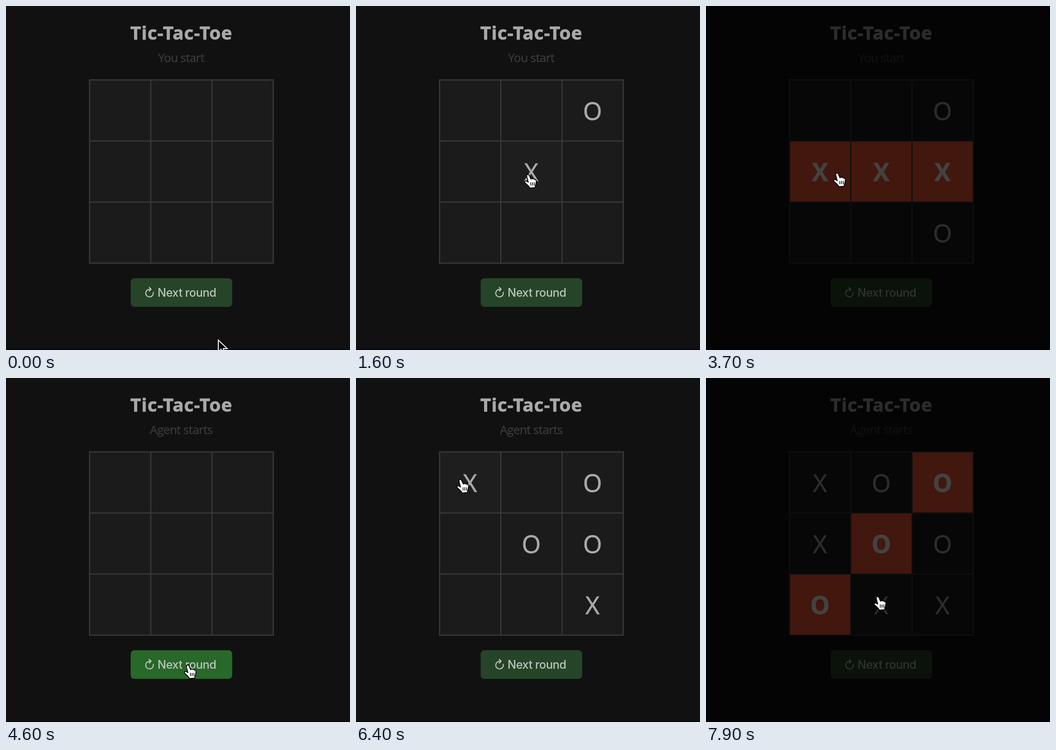
An HTML page that plays this animation: 747x749 px, repeating every 8 s.

```html
<!DOCTYPE html>
<html lang="en">
<head>
<meta charset="utf-8">
<title>Tic-Tac-Toe</title>
<style>
  html, body { margin: 0; width: 100%; height: 100%; overflow: hidden; background: #111; }
  svg { display: block; width: 100%; height: 100%; }
  text { font-family: "Open Sans", "Noto Sans", sans-serif; text-anchor: middle; fill: #a9a9a9; stroke: #a9a9a9; stroke-width: .8; }
  .title { font-size: 40px; font-weight: 700; letter-spacing: .022em; }
  .sub { font-size: 26px; letter-spacing: -.03em; fill: #3a3a3a; stroke: #3a3a3a; stroke-width: .4; }
  .mark { font-size: 53px; }
  .mark.win { font-weight: 700; fill: #fff; stroke: #fff; }
  .label { font-family: Inter, Roboto, sans-serif; font-size: 25px; font-weight: 500; letter-spacing: -.02em; text-anchor: start; fill: #bcc3bc; stroke: none; }
</style>
</head>
<body>
<svg viewBox="0 0 747 749"></svg>
<script>
const LOOP = 8000, STEP = 100, TRAVEL = 500, RESET = 4600;
const svg = document.querySelector('svg');

// Cursor stops: arrival time, x, y and, for a turn, the cell of the reply (-1: none).
// A turn puts X in the cell under the cursor, then O in the reply cell.
const stops = [
  [0, 461, 726], [300, 375, 440], [800, 242, 352], [1600, 372, 366, 2],
  [2100, 476, 384], [3000, 476, 384, 8], [3700, 283, 363, -1],
  [RESET, 393, 624], [5200, 393, 624, 2], [5700, 510, 490, 5],
  [6200, 225, 220, 4], [7000, 240, 360, 1], [7800, 371, 475, 6]
];

const lines = ['012', '345', '678', '036', '147', '258', '048', '246'];
const CELL = 130.4, PITCH = 133, LEFT = 182.7, TOP = 162.2;

function cursorAt(t) {
  const i = stops.findLastIndex(s => s[0] <= t);
  const [t0, x0, y0] = stops[i], [t1, x1, y1] = stops[i + 1] || [LOOP, x0, y0];
  const time = Math.min(TRAVEL, t1 - t0);
  const k = Math.max(0, 1 - (t1 - t) / time);
  const ease = k * k * (3 - 2 * k);
  return [x0 + (x1 - x0) * ease, y0 + (y1 - y0) * ease];
}

function cellAt(x, y) {
  const col = Math.floor((x - LEFT) / PITCH), row = Math.floor((y - TOP) / PITCH);
  return col >= 0 && col < 3 && row >= 0 && row < 3 ? row * 3 + col : -1;
}

function boardAt(t) {
  const board = Array(9).fill('');
  const put = (mark, cell) => { if (cell >= 0) board[cell] = mark; };
  for (const [at, x, y, reply] of stops) {
    if (reply === undefined || at > t || (at < RESET && t >= RESET)) continue;
    put('X', cellAt(x, y));
    put('O', reply);
  }
  return board;
}

const rect = (x, y, w, h, fill, extra = '') =>
  `<rect x="${x}" y="${y}" width="${w}" height="${h}" fill="${fill}" ${extra}/>`;
const text = (x, y, cls, s) => `<text x="${x}" y="${y}" class="${cls}">${s}</text>`;

const hand = `<path d="M-1.5 4Q-1.5 1 1 .8Q3.6 .6 4.6 3.5L7.8 11Q10 9 12.5 10.5Q15 9.6 16.5 12
  Q19.8 12 19.7 15.5L18.5 22Q17 25 17 29.5L5.5 30.5Q4 27 1 24.5L-5.5 18.5Q-6.5 14.2 -2 15L2 17.5Z"
  fill="#fff" stroke="#000" stroke-width="1.8" stroke-linejoin="round"/>
  <path d="M7.5 18V25M11.3 18V25M15 18V25" stroke="#000" stroke-width="1.5"/>`;
const arrow = `<path d="M0 1.5V27L6 21.5L10.5 31.5L15 29.5L10.8 20H19.5Z"
  fill="#000" stroke="#fff" stroke-width="2"/>`;
const icon = `<path d="M319.6 622.5A8.3 8.3 0 1 1 311.5 616.8H314M310.5 612L315 616.8L310.5 621.4"
  fill="none" stroke="#bcc3bc" stroke-width="2.3"/>`;

function draw(t) {
  const [cx, cy] = cursorAt(t), board = boardAt(t), over = cellAt(cx, cy);
  const won = lines.find(l => board[l[0]] && [...l].every(c => board[c] === board[l[0]])) || '';
  const onButton = cx > 271 && cx < 491 && cy > 593 && cy < 655;

  let out = rect(0, 0, 747, 749, '#111') + rect(0, 747.6, 747, 1.4, '#000')
    + text(380.9, 73, 'title', 'Tic-Tac-Toe')
    + text(380.5, 122, 'sub', t < RESET ? 'You start' : 'Agent starts')
    + rect(180.1, 159.6, 401.6, 401.6, '#393939');

  board.forEach((mark, i) => {
    const x = LEFT + PITCH * (i % 3), y = TOP + PITCH * Math.floor(i / 3);
    const win = won.includes(i);
    const fill = win ? '#ff5a34' : over !== i ? '#1b1b1b' : mark ? '#1e1e1e' : '#2d2d2d';
    out += rect(x, y, CELL, CELL, fill);
    if (mark) out += text(x + 64.9, y + 85.7, win ? 'mark win' : 'mark', mark);
  });

  out += rect(270.7, 592.8, 220.5, 62.2, onButton && !won ? '#286829' : '#264427', 'rx="8"')
    + icon + text(329, 633.3, 'label', 'Next round');
  if (won) out += rect(0, 0, 747, 749, '#000', 'opacity=".74"');

  const pointer = onButton || over >= 0 ? hand : arrow;
  svg.innerHTML = out + `<g transform="translate(${cx} ${cy})">${pointer}</g>`;
}

const start = performance.now();
let last = -1;
function tick() {
  const t = Math.floor((performance.now() - start) % LOOP / STEP) * STEP;
  if (t !== last) draw(last = t);
  requestAnimationFrame(tick);
}
tick();
</script>
</body>
</html>
```
